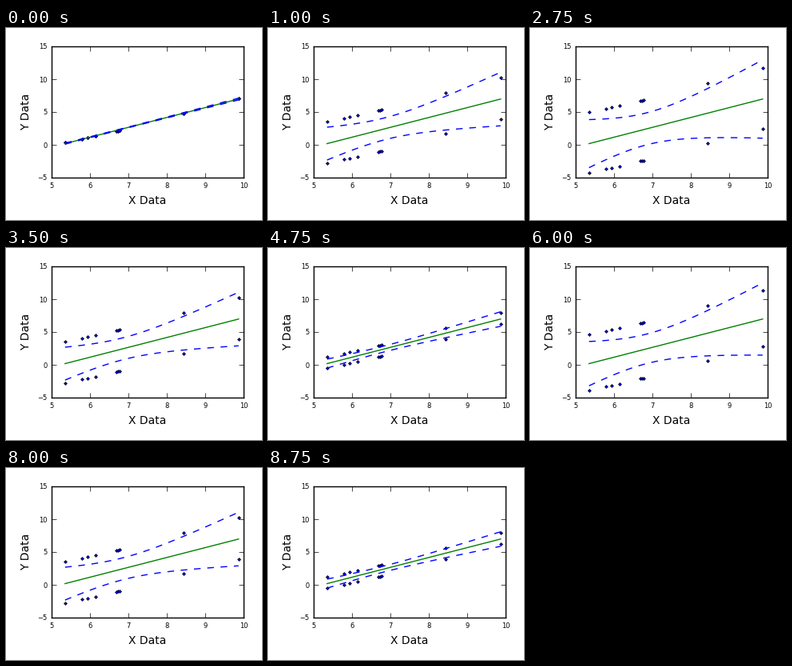
Recreate the animation shown at these times as a matplotlib script. Size 320x240 px, loop 9 s.

```python
import numpy as np
import matplotlib.pyplot as plt
from matplotlib.animation import FuncAnimation

W, H, DPI = 320, 240, 100
FRAMES, INTERVAL = 36, 250
SPREAD = 4.9
T_CRIT = 2.12  # two-sided 95 %, 16 degrees of freedom

plt.rcParams.update({
    "font.family": "DejaVu Sans",
    "axes.linewidth": 1.0,
    "axes.unicode_minus": True,
    "lines.scale_dashes": False,
})

x = np.array([5.35, 5.79, 5.94, 6.15, 6.69, 6.73, 6.78, 8.44, 9.87])
y = np.array([0.38, 0.90, 1.07, 1.37, 2.11, 2.13, 2.19, 4.81, 7.09])
xx = np.tile(x, 2)
grid = np.linspace(x.min(), x.max(), 100)


def fit_band(ys):
    """Least-squares line and the half-width of its confidence band."""
    slope, icept = np.polyfit(xx, ys, 1)
    n, mean = len(xx), xx.mean()
    err = np.sqrt(np.sum((ys - slope * xx - icept) ** 2) / (n - 2))
    sxx = np.sum((xx - mean) ** 2)
    half = T_CRIT * err * np.sqrt(1 / n + (grid - mean) ** 2 / sxx)
    return slope * grid + icept, half


fig = plt.figure(figsize=(W / DPI, H / DPI), dpi=DPI, facecolor="white")
ax = fig.add_axes([57 / W, 53 / H, 240 / W, 164 / H])
ax.set(xlim=(5, 10), ylim=(-5, 15), xticks=range(5, 11), yticks=range(-5, 16, 5))
ax.tick_params(direction="in", top=True, right=True, length=4, width=0.5,
               pad=4, labelsize=6)
fig.text(177 / W, 20 / H, "X Data", size=10, ha="center", va="baseline")
fig.text(29.5 / W, 135 / H, "Y Data", size=10, ha="center", va="baseline",
         rotation=90, rotation_mode="anchor")

dots, = ax.plot([], [], "D", ms=2, mfc="blue", mec="black", mew=0.5, zorder=1.5)
line, = ax.plot([], [], color="green", lw=1)
bands = [ax.plot([], [], color="blue", lw=1, dashes=(6, 6))[0] for _ in range(2)]


def update(i):
    amp = SPREAD * np.sin(2 * np.pi * i / FRAMES)
    ys = np.concatenate([y + amp, y - amp])
    mid, half = fit_band(ys)
    dots.set_data(xx, ys)
    line.set_data(grid, mid)
    for band, sign in zip(bands, (1, -1)):
        band.set_data(grid, mid + sign * half)
    return [dots, line, *bands]


anim = FuncAnimation(fig, update, frames=FRAMES, interval=INTERVAL,
                     repeat=True, repeat_delay=0)
plt.show()
```
